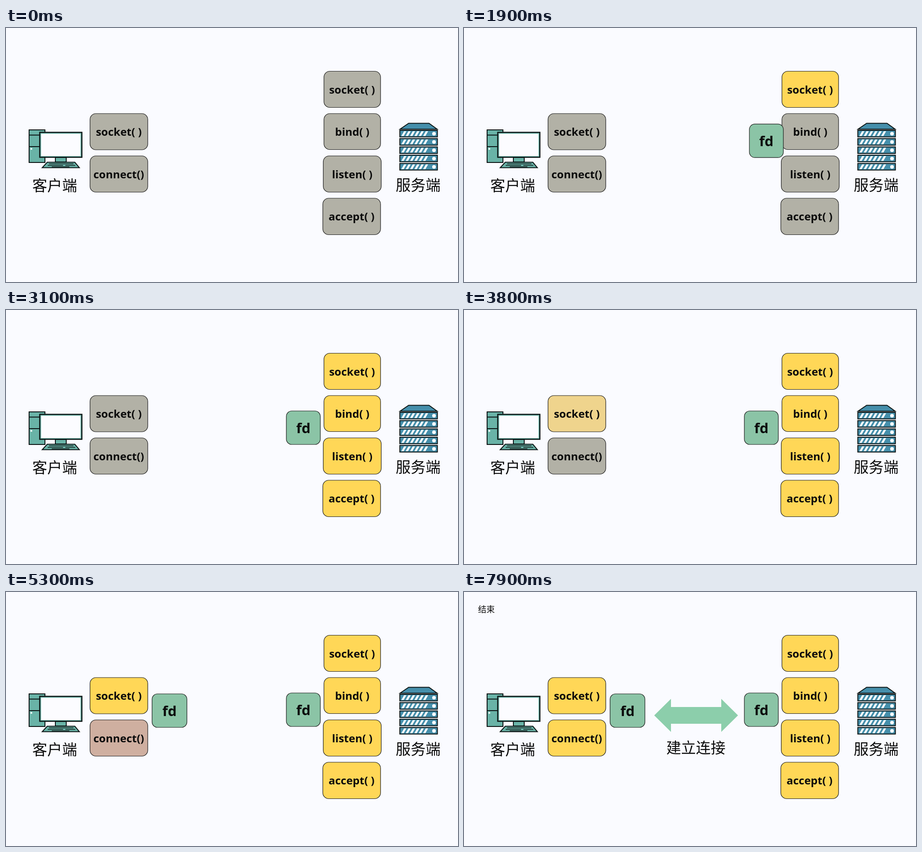
An HTML page that plays this animation: 998 by 561 pixels, repeating every 8000 ms.

```html
<!DOCTYPE html>
<html lang="zh">
<head>
<meta charset="utf-8">
<style>
  html, body { margin: 0; width: 100%; height: 100%; overflow: hidden; background: #fafbff; }
  svg { display: block; width: 100%; height: 100%; }
  text { text-anchor: middle; fill: #0b0b0b; }
  .call { font: 600 24px "Noto Sans", "Open Sans", sans-serif; }
  .fd { font: bold 31px "Noto Sans", "Open Sans", sans-serif; }
  .label { font: 33px "Noto Sans CJK SC", "Noto Sans CJK", sans-serif; }
  .box { stroke: #1c1c1c; stroke-width: 1.2; }
  .pc, .rack { stroke: #0c1414; stroke-width: 2; }
  .pc { fill: #69b3a7; }
  .rack { fill: #458fab; }
</style>
</head>
<body>
<svg id="stage" viewBox="0 0 998 561">
  <g class="pc">
    <rect x="51" y="225" width="35" height="72"/>
    <path d="M51 236.500H86M51 262H86"/>
    <circle cx="56" cy="267" r="2" fill="#fff" stroke="none"/>
    <path d="M109 286H133V296H109Z"/>
    <rect x="74.500" y="230.500" width="93" height="55" stroke-width="2.500"/>
    <rect x="77.500" y="233.500" width="87" height="49.500" fill="#fcfcff" stroke="none"/>
    <path d="M91 296.500H152L162 308.500H80Z"/>
    <path d="M95 300H149M92 303.500H126M131 303.500H153M101 306.500H140" fill="none" stroke-width="1.500"/>
  </g>
  <g id="rack" class="rack">
    <path d="M889 210.500H934L952 223.500H870Z"/>
  </g>
  <text class="label" x="107.500" y="359.500">客户端</text>
  <text class="label" x="910" y="358.500">服务端</text>
  <g id="calls"></g>
  <g id="link">
    <path fill="#8cceab" d="M420 272.500L457 236V254H568V236L605 272.500L568 309V291H457V309Z"/>
    <text class="label" x="512" y="355.500" style="font-size:32.700px">建立连接</text>
  </g>
  <text id="end" class="label" x="49.500" y="44.500" style="font-size:18.500px">结束</text>
</svg>
<script>
const $ = id => document.getElementById(id);
// Grey warms through pink and sand before it reaches yellow
const RAMP = [[178, 177, 166], [207, 175, 160], [216, 203, 171], [239, 212, 141], [255, 215, 87]];

function add(parent, tag, attrs, text = "") {
  const node = document.createElementNS("http://www.w3.org/2000/svg", tag);
  for (const key in attrs) node.setAttribute(key, attrs[key]);
  node.textContent = text;
  return parent.appendChild(node);
}

// Server units with slanted vents and a lamp
for (let i = 0; i < 5; i++) {
  const y = 226 + i * 18.3;
  add($("rack"), "rect", { x: 869.5, y, width: 83, height: 14.5 });
  let vents = "";
  for (let x = 873; x < 925; x += 9.6) vents += `M${x} ${y + 12.5}l6 -10.500h5l-6 10.500z`;
  add($("rack"), "path", { d: vents, fill: "#fff", stroke: "none" });
  add($("rack"), "circle", { cx: 945, cy: y + 7.5, r: 4, fill: "#fff", stroke: "none" });
}

// name, x, y, width, height, text x, colour change start
const calls = [
  ["socket( )", 702, 95.5, 125, 80, 764, 300],
  ["bind( )", 702, 189, 125, 79.5, 764.5, 2300],
  ["listen( )", 700.5, 282.5, 128, 80, 764.5, 2300],
  ["accept( )", 699.5, 376, 127.5, 80.5, 763, 2300],
  ["socket( )", 185.5, 189, 127.5, 80, 249, 3350],
  ["connect()", 185.5, 282.5, 127.5, 80, 249, 5150]
].map(([name, x, y, width, height, cx, start]) => {
  const rect = add($("calls"), "rect", { class: "box", x, y, width, height, rx: 13 });
  add($("calls"), "text", { class: "call", x: cx, y: y + 49 }, name);
  return { rect, start };
});

// Descriptors come out of the socket boxes and slide to their places
const descriptors = [
  { x: 619, y: 223, w: 75, dx: 107, dy: -105, show: 1000, start: 1100 },
  { x: 322.5, y: 225, w: 77, dx: -108, dy: -28, show: 4000, start: 4100 }
].map(d => {
  d.node = add($("stage"), "g", {});
  add(d.node, "rect", { class: "box", x: d.x, y: d.y, width: d.w, height: 74, rx: 12, fill: "#8bc4a6" });
  add(d.node, "text", { class: "fd", x: d.x + d.w / 2, y: d.y + 49 }, "fd");
  return d;
});

const progress = (t, start, length) => Math.min(1, Math.max(0, (t - start) / length));
const ease = p => p * p * (3 - 2 * p);
const show = (node, on) => node.setAttribute("visibility", on ? "visible" : "hidden");

function rampColor(p) {
  const pos = p * (RAMP.length - 1);
  const i = Math.min(Math.floor(pos), RAMP.length - 2);
  return `rgb(${RAMP[i].map((c, k) => Math.round(c + (RAMP[i + 1][k] - c) * (pos - i)))})`;
}

function draw(now) {
  const t = Math.floor(now % 8000 / 100) * 100;
  for (const { rect, start } of calls) rect.setAttribute("fill", rampColor(progress(t, start, 600)));
  for (const d of descriptors) {
    const left = 1 - ease(progress(t, d.start, 1000));
    d.node.setAttribute("transform", `translate(${d.dx * left} ${d.dy * left})`);
    show(d.node, t >= d.show);
  }
  $("link").setAttribute("opacity", progress(t, 6000, 600));
  show($("end"), t >= 7000);
}

const origin = performance.now();
function tick() {
  draw(performance.now() - origin);
  requestAnimationFrame(tick);
}
tick();
</script>
</body>
</html>
```
